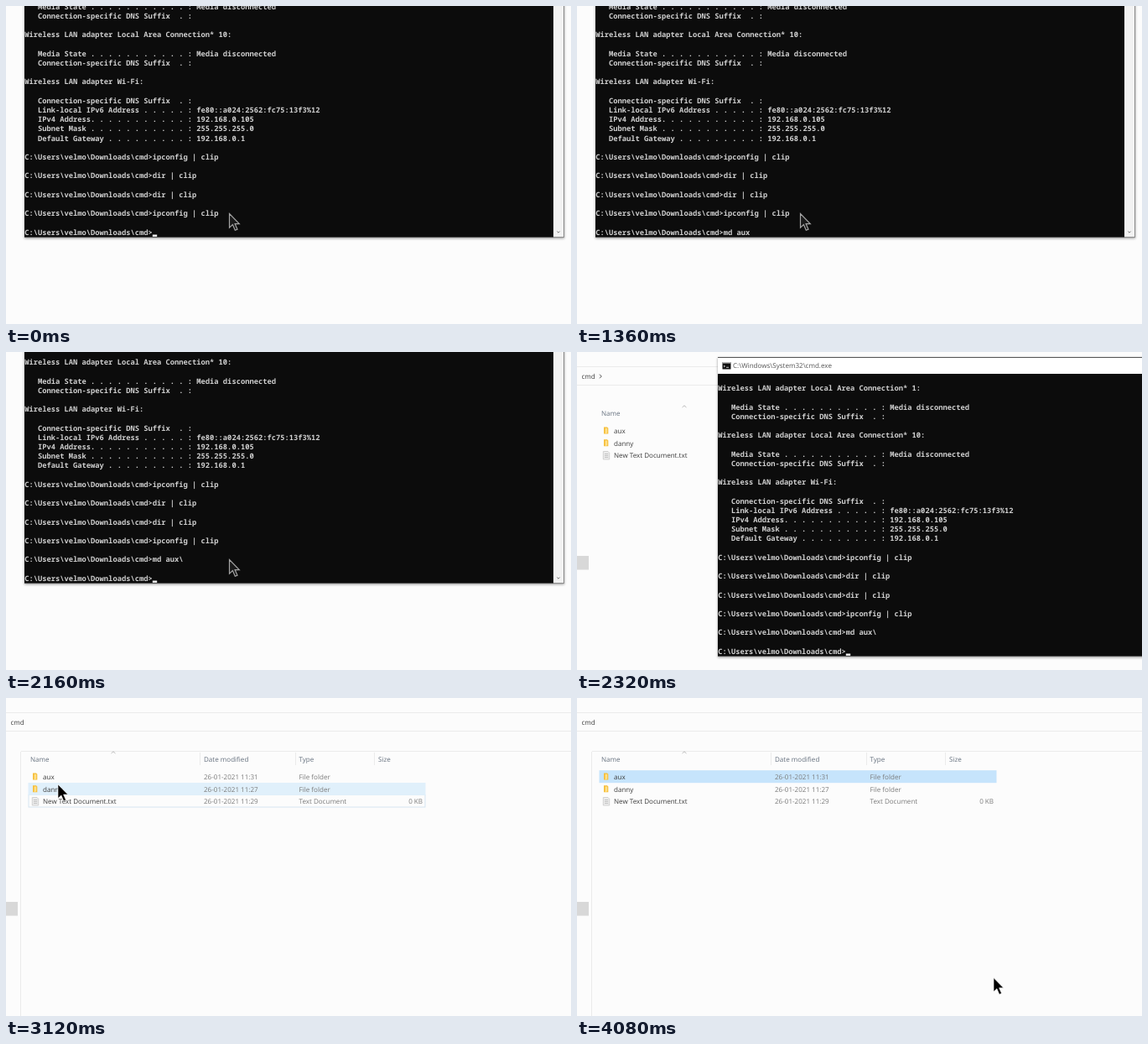
Animation, 674 px wide and 379 px high, one loop 4.16 s. Source, as an HTML page:

```html
<!DOCTYPE html>
<html lang="en">
<head>
<meta charset="utf-8">
<title>Terminal and folder</title>
<style>
  html, body { margin: 0; width: 100%; height: 100%; overflow: hidden; background: #fcfcfc; }
  svg { display: block; width: 674px; height: 379px; }
  text { white-space: pre; text-rendering: geometricPrecision; }
  #explorer text, #title { font: 8.05px "Open Sans", "Noto Sans", sans-serif; }
  #screen text { font: 650 8.77px "Noto Sans Mono", "DejaVu Sans Mono", monospace; fill: #cfcfcf; }
  .name { fill: #3c3c3c; }
  .info { fill: #7b7b7b; }
  .head { fill: #66717f; }
  .rule { stroke: #ebebeb; fill: none; }
</style>
</head>
<body>
<svg viewBox="0 0 674 379">
  <defs>
    <clipPath id="pane"><rect x="168" y="26" width="632" height="336.5"/></clipPath>
    <filter id="shadow" x="-5%" y="-5%" width="110%" height="110%">
      <feDropShadow dx="0" dy="1" stdDeviation="1.5" flood-opacity=".4"/>
    </filter>
    <g id="folder">
      <path d="M0 0H4L5.3 1.3V8H0Z" fill="#f5bd36"/>
      <path d="M1.6 1.2H4.2V7L1.6 8Z" fill="#ffe08a"/>
    </g>
  </defs>
  <g id="world">
    <g id="explorer">
      <path class="rule" d="M-200 17.5H674M-200 39.5H674"/>
      <path class="rule" id="columns" d="M18 63.5H674M231.5 65V80M345.5 65V80M439.5 65V80"/>
      <path class="rule" id="divider" d="M17.5 64V379"/>
      <rect y="243" width="14" height="16.5" fill="#d8d8d8"/>
      <text class="name" x="5.5" y="31.8">cmd</text>
      <path id="crumb" d="M27 26.7L29.3 29L27 31.3" fill="none" stroke="#555"/>
      <path d="M125.5 66L128 63.8L130.5 66" fill="none" stroke="#aaa" stroke-width=".8"/>
      <rect id="focus" x="27" y="115.5" width="473" height="14.5" fill="none" stroke="#d5e5f1"/>
      <rect id="hover" x="26.5" width="474" height="15"/>
      <g id="table"></g>
    </g>
    <g id="terminal">
      <rect x="168" y="6" width="644" height="357" fill="#8c8c8c" filter="url(#shadow)"/>
      <rect x="168" y="6" width="643" height="1" fill="#555"/>
      <rect x="168" y="7" width="643" height="19" fill="#fff"/>
      <rect x="173.5" y="12" width="10" height="8.5" fill="#111"/>
      <path d="M173.5 12.8H183.5" stroke="#ccc" stroke-width="1.4"/>
      <path d="M175 16L176.5 17L175 18M178 18.3H181" fill="none" stroke="#eee" stroke-width=".8"/>
      <text id="title" x="186" y="19.2" fill="#555">C:\Windows\System32\cmd.exe</text>
      <rect x="168" y="26" width="631" height="336.5" fill="#0c0c0c"/>
      <rect x="799" y="26" width="12" height="336" fill="#f2f2f2"/>
      <path d="M803.4 355.6L805 357.2L806.6 355.6" fill="none" stroke="#606060" stroke-width=".9"/>
      <g id="screen" clip-path="url(#pane)">
        <g id="lines"></g>
        <rect id="caret" width="5.4" height="2.4" fill="#f2f2f2"/>
      </g>
    </g>
  </g>
  <path id="mouse" d="M0 0V16.6L3.9 13L6.8 19.8L9.5 18.6L6.6 12.1H11.8Z"/>
</svg>
<script>
const LOOP = 4160, STEP = 80;
const CELL = 5.262, ROW = 11.2, LEFT = 168.2, BASE = 46.1;
const USER = 'velmo', PROMPT = `C:\\Users\\${USER}\\Downloads\\cmd>`;

const $ = id => document.getElementById(id);
const show = (el, on) => el.setAttribute('visibility', on ? 'visible' : 'hidden');
const move = (el, x, y) => el.setAttribute('transform', `translate(${x} ${y})`);

function addText(parent, x, y, str, cls = '', anchor = 'start') {
  const el = document.createElementNS('http://www.w3.org/2000/svg', 'text');
  const attrs = { x, y, class: cls, 'text-anchor': anchor };
  for (const key in attrs) el.setAttribute(key, attrs[key]);
  el.textContent = str;
  parent.append(el);
  return el;
}

// Dotted leader up to the colon in column 37
function field(label, value = '') {
  let s = '   ' + label;
  while (s.length < 37) s += s.length % 2 ? '.' : ' ';
  return s + ': ' + value;
}

const suffix = field('Connection-specific DNS Suffix ');
const adapter = name => 'Wireless LAN adapter ' + name + ':';
const offline = name => [adapter(name), '', field('Media State', 'Media disconnected'), suffix, ''];
const output = [
  ...offline('Local Area Connection* 1'),
  ...offline('Local Area Connection* 10'),
  adapter('Wi-Fi'), '', suffix,
  field('Link-local IPv6 Address', 'fe80::a024:2562:fc75:13f3%12'),
  field('IPv4 Address', '192.168.0.105'),
  field('Subnet Mask', '255.255.255.0'),
  field('Default Gateway', '192.168.0.1'), '',
  ...['ipconfig', 'dir', 'dir', 'ipconfig'].flatMap(c => [`${PROMPT}${c} | clip`, ''])
];
const addLine = (str, row) => addText($('lines'), LEFT, BASE + row * ROW, str);
output.forEach((str, row) => str && addLine(str, row));
const command = addLine(PROMPT, 26);
const nextPrompt = addLine(PROMPT, 28);

const table = $('table');
[['Name', 29], ['Date modified', 236], ['Type', 349.5], ['Size', 444]]
  .forEach(([str, x]) => addText(table, x, 75.9, str, 'head'));
[['aux', '11:31', 'File folder'], ['danny', '11:27', 'File folder'],
 ['New Text Document.txt', '11:29', 'Text Document', '0 KB']].forEach(([name, time, type, size], i) => {
  const y = 96.9 + i * 14.75;
  addText(table, 44, y, name, 'name');
  addText(table, 236, y, '26-01-2021 ' + time, 'info');
  addText(table, 349.5, y, type, 'info');
  if (size) addText(table, 497, y, size, 'info', 'end');
});
table.insertAdjacentHTML('beforeend', `
  <use href="#folder" x="32" y="89.5"/><use href="#folder" x="32" y="104.2"/>
  <path d="M31.3 118.5H37L38.7 120.2V128H31.3Z" fill="#ececec" stroke="#c4c4c4" stroke-width=".7"/>
  <path d="M33 121.5H37.2M33 123.5H37.2M33 125.5H37.2" stroke="#b0b0b0" stroke-width=".7"/>`);

// Each table holds [start time, value...]
const TYPED = [[0, ''], [80, 'm'], [160, 'md'], [240, 'md '], [720, 'md a'],
  [960, 'md au'], [1120, 'md aux'], [1760, 'md aux\\']];
const BLINK = [[0, 1], [320, 0], [800, 1], [1360, 0], [1840, 1], [2080, 0], [2160, 1]];
const SCROLL = [[0, 0], [2080, 1], [2160, 2]];
const PAN = [[0, 0], [2240, 0.6], [2320, 1]];
const HOVER = [[0, -1], [3040, 2, '#e2f0fa'], [3120, 1, '#e0f0fb'], [3200, 0, '#e0f0fb'], [3440, 0, '#c6e4fc']];
const MOUSE = [[0, 266.5, 247.5], [2240, -99, -99], [2880, 402, 326], [2960, 262, 226], [3040, 110, 132],
  [3120, 62, 103], [3200, 58, 97], [3280, 56, 93], [3360, 55, 92],
  [3520, 118, 130], [3600, 285, 232], [3680, 440, 312], [3760, 500.5, 333.5], [4080, 497, 333.5]];
const at = (steps, t) => steps.findLast(s => s[0] <= t).slice(1);

function draw(t) {
  const [typed] = at(TYPED, t), [scroll] = at(SCROLL, t), [pan] = at(PAN, t);
  const [row, fill] = at(HOVER, t), [x, y] = at(MOUSE, t);
  const inTerminal = t < 2400;

  move($('world'), Math.round(-146 * (1 - pan)), Math.round(-87 * (1 - pan)));
  show($('terminal'), inTerminal);
  move($('lines'), 0, (2 - scroll) * ROW);
  command.textContent = PROMPT + typed;
  nextPrompt.textContent = scroll === 2 ? PROMPT : '';
  const col = PROMPT.length + (scroll ? 0 : typed.length);
  move($('caret'), LEFT + col * CELL, BASE + 28 * ROW - 0.2);
  $('caret').setAttribute('opacity', at(BLINK, t)[0]);

  show($('crumb'), inTerminal);
  show($('columns'), !inTerminal);
  show($('divider'), t >= 2480);
  show($('focus'), !inTerminal && t < 3440);
  show($('hover'), row >= 0);
  $('hover').setAttribute('y', 86.2 + row * 14.75);
  $('hover').setAttribute('fill', fill || 'none');

  const mouse = $('mouse');
  move(mouse, x, y);
  mouse.setAttribute('fill', inTerminal ? '#1a1a1a' : '#000');
  mouse.setAttribute('stroke', inTerminal ? '#a4a4a4' : '#fff');
  mouse.setAttribute('stroke-width', inTerminal ? 1.2 : 0.6);
}

const start = performance.now();
function tick() {
  const t = (performance.now() - start) % LOOP;
  draw(Math.floor(t / STEP) * STEP);
  requestAnimationFrame(tick);
}
tick();
</script>
</body>
</html>
```
